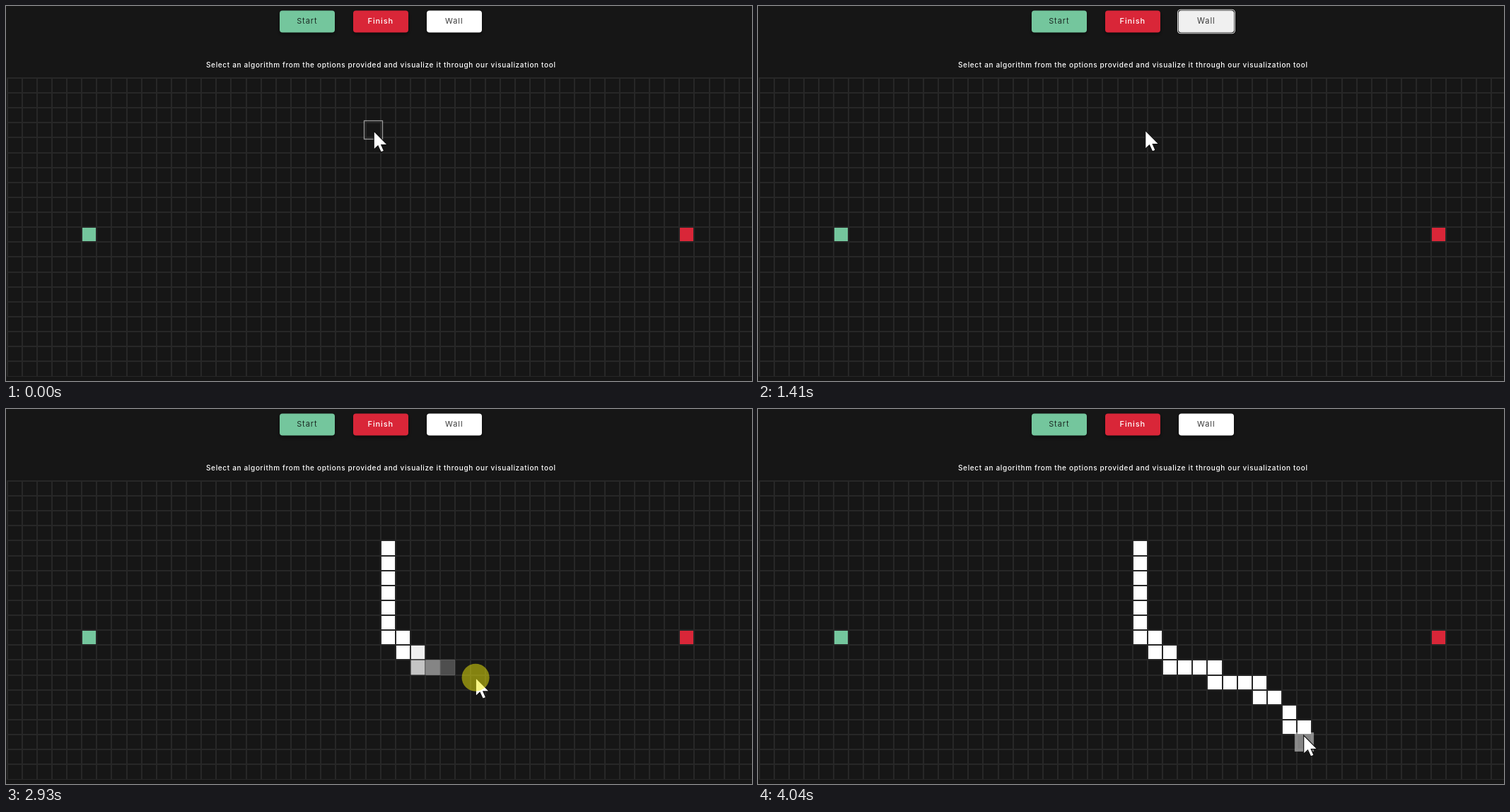
Recreate the animation shown at these times as an HTML page. Size 1055 by 531 pixels, loop 4.66 s.

```html
<!DOCTYPE html>
<html lang="en">
<head>
<meta charset="utf-8">
<title>Drawing a wall</title>
<style>
  html, body { margin: 0; width: 100%; height: 100%; overflow: hidden; background: #161616; }
  svg { display: block; width: 100%; height: 100%; }
  text { font-family: Inter, "Open Sans", sans-serif; }
  .label { font-size: 11px; letter-spacing: .9px; }
</style>
</head>
<body>
<svg id="stage" viewBox="0 0 1055 531">
  <defs>
    <filter id="soft" x="-20%" y="-40%" width="140%" height="200%"><feGaussianBlur stdDeviation="2"/></filter>
  </defs>
  <rect width="1055" height="531" fill="#161616"/>
  <rect x="1" y="101" width="1054" height="424" fill="#272727"/>
  <path id="holes" fill="#161616"/>
  <g id="cells"></g>
  <rect id="hover" fill="none" stroke="#fff" stroke-width="1.3"/>
  <g id="buttons"></g>
  <text x="283" y="86.5" font-size="10" font-weight="500" letter-spacing=".66" fill="#fff">Select an algorithm from the options provided and visualize it through our visualization tool</text>
  <g id="cursor">
    <path id="arrow" d="M.2 .2V26.4L6 21L10.2 30L14.6 28.2L10.8 19.6H19.4Z" fill="#fff" stroke="#111" stroke-width="1.2"/>
    <g id="hand" stroke="#222" stroke-width=".9" stroke-linejoin="round" stroke-linecap="round">
      <path d="M-3 2Q-3 -1 0 -1T3 2V9Q6 7 8 10Q11 8 12.5 11.5Q17 10 17 15V23Q17 27 14.5 30V35H-.5V31L-8.5 22Q-10.5 18 -7 17.5Q-5 17.5 -3 20Z" fill="#fff"/>
      <path d="M3 9V17M8 10V17M12.5 11.5V18" fill="none"/>
    </g>
  </g>
  <circle id="press" r="19.5" fill="#f2ee0a" opacity=".5"/>
</svg>
<script>
const LOOP = 4660, STEP = 80, PITCH = 21.13, X0 = 1.5, Y0 = 101.9;
const $ = id => document.getElementById(id);
const set = (el, attrs) => { for (const k in attrs) el.setAttribute(k, attrs[k]); };
const make = (parent, tag, attrs) => {
  const el = document.createElementNS("http://www.w3.org/2000/svg", tag);
  set(el, attrs);
  return parent.appendChild(el);
};
const show = (el, on) => el.setAttribute("visibility", on ? "visible" : "hidden");
const smooth = (a, b, t) => {
  const k = Math.min(1, Math.max(0, (t - a) / (b - a)));
  return k * k * (3 - 2 * k);
};

// Inside of a grid cell, snapped to whole pixels within a 1px border
function cellBox(c, r) {
  const edge = (o, i) => Math.round(o + i * PITCH);
  const x = edge(X0, c) + 1, y = edge(Y0, r) + 1;
  return { x, y, width: edge(X0, c + 1) - 1 - x, height: edge(Y0, r + 1) - 1 - y };
}
function cellCenter(c, r) {
  const b = cellBox(c, r);
  return [b.x + b.width / 2, b.y + b.height / 2];
}
function grown(c, r, by) {
  const b = cellBox(c, r);
  return { x: b.x - by, y: b.y - by, width: b.width + 2 * by, height: b.height + 2 * by };
}

// Pointer key points [ms, x, y], joined by monotone curves
const keys = [[30, 520, 177], [530, 639, 15], [1200, 639, 15], [1400, 547.5, 176], [1960, 519.5, 177.5],
  [2050, 511, 179], [2200, 537, 197], [2600, 543, 304.5], [2760, 585, 356], [2850, 634.5, 375],
  [3060, 711, 389], [3160, 730, 406.5], [3400, 754, 435], [3760, 771.5, 462]];
const slope = (i, a) => keys[i + 1] && keys[i] ? (keys[i + 1][a] - keys[i][a]) / (keys[i + 1][0] - keys[i][0]) : 0;
function tangent(i, a) {
  const p = slope(i - 1, a), q = slope(i, a);
  return p * q > 0 ? 2 * p * q / (p + q) : 0;
}
function pointer(t) {
  const last = keys.length - 1;
  if (t <= keys[0][0]) return keys[0].slice(1);
  if (t >= keys[last][0]) return keys[last].slice(1);
  const i = keys.findIndex(k => k[0] > t) - 1;
  const h = keys[i + 1][0] - keys[i][0], k = (t - keys[i][0]) / h, s = k * k * (3 - 2 * k);
  return [1, 2].map(a => keys[i][a] * (1 - s) + keys[i + 1][a] * s +
    h * k * (1 - k) * ((1 - k) * tangent(i, a) - k * tangent(i + 1, a)));
}
// Moment when the dragged pointer comes closest to a cell
function reached(c, r) {
  const [cx, cy] = cellCenter(c, r);
  let best = 1e9, when = 0;
  for (let t = 2150; t < 3760; t += 4) {
    const [x, y] = pointer(t), d = Math.hypot(x - cx, y - cy);
    if (d < best) { best = d; when = t; }
  }
  return when;
}

let holes = "";
for (let c = 0; c < 50; c++) for (let r = 0; r < 20; r++) {
  const b = cellBox(c, r);
  holes += `M${b.x} ${b.y}h${b.width}v${b.height}h${-b.width}z`;
}
$("holes").setAttribute("d", holes);
make($("cells"), "rect", { ...cellBox(5, 10), fill: "#74c69d" });
make($("cells"), "rect", { ...cellBox(45, 10), fill: "#d92638" });

// The wall as a walk: down, right, or x for a diagonal step
const walls = [];
let col = 25, row = 4;
for (const move of ".ddddddrdrdrrrdrrrdrxdr") {
  if ("rx".includes(move)) col++;
  if ("dx".includes(move)) row++;
  walls.push({ c: col, r: row, at: reached(col, row), el: make($("cells"), "rect", { fill: "#fff" }) });
}
const lastCell = make($("cells"), "rect", { fill: "#fff" });

function button(x, label, fill, ink, weight) {
  const g = make($("buttons"), "g", {});
  const box = { x: x - 39, width: 78, height: 31, rx: 4 };
  make(g, "rect", { ...box, y: 9, fill: "#000", opacity: .45, filter: "url(#soft)" });
  make(g, "rect", { ...box, y: 6.5, fill });
  make(g, "text", { x: x - .2, y: 25.3, "text-anchor": "middle", class: "label", fill: ink, "font-weight": weight })
    .textContent = label;
  return g;
}
button(426, "Start", "#74c69d", "#1c2b24", 400);
button(530, "Finish", "#d92638", "#fff", 500);
const wallButton = button(634, "Wall", "#fff", "#3a3a3a", 400);
const ring = make($("buttons"), "rect", { x: 593.8, y: 5.4, width: 80.4, height: 33.2, rx: 4,
  fill: "none", stroke: "#fff", "stroke-width": 1.1, opacity: .85 });

function draw(t) {
  const [x, y] = pointer(t);
  const overButton = x > 595 && x < 673 && y < 38;
  set($("cursor"), { transform: `translate(${x} ${y})` });
  set($("press"), { cx: x, cy: y });
  show($("press"), t >= 920 && t < 1080 || t >= 1880 && t < 4040);
  show($("hand"), overButton);
  show($("arrow"), !overButton);

  const lit = smooth(350, 530, t) - smooth(1200, 1480, t);
  const grow = `translate(634 22) scale(${1 + .03 * lit}) translate(-634 -22)`;
  set(wallButton, { opacity: 1 - .32 * lit, transform: grow });
  set(ring, { transform: grow });
  show(ring, t >= 920 && t < 1880);

  const near = 1 - smooth(60, 300, t) + smooth(1480, 1720, t) - smooth(2090, 2290, t);
  set($("hover"), { ...grown(24, 3, 3.5 * near), opacity: .55 * near });

  for (const w of walls) {
    const k = smooth(w.at + 40, w.at + 210, t);
    set(w.el, { ...grown(w.c, w.r, 1.5 * (1 - k)), opacity: k });
  }
  const k = smooth(3700, 3920, t);
  set(lastCell, { ...grown(36, 17, 4.1 * k), opacity: .47 * k });
}

const start = performance.now();
function frame() {
  const t = (performance.now() - start) % LOOP;
  const tick = Math.floor((t + STEP / 2) / STEP) * STEP - STEP / 2;
  draw(Math.max(0, tick));
  requestAnimationFrame(frame);
}
frame();
</script>
</body>
</html>
```
